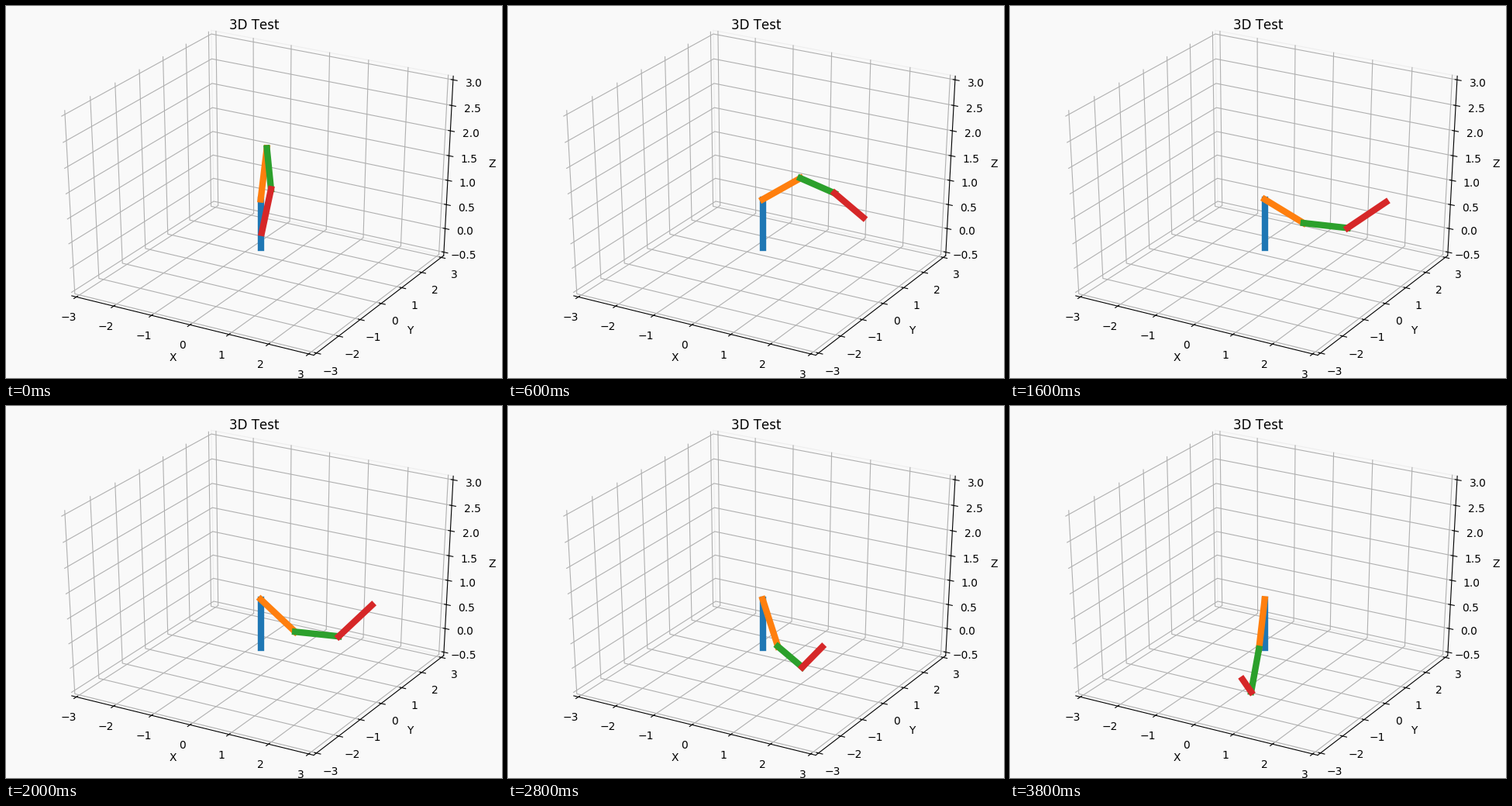
Recreate the animation shown at these times as a matplotlib script. Size 640 by 480 pixels, loop 4 s.

```python
import numpy as np
import matplotlib.pyplot as plt
from matplotlib.animation import FuncAnimation

plt.rcParams["font.family"] = "DejaVu Sans"
plt.rcParams["text.kerning_factor"] = 6

W, H, DPI = 640, 480, 100
STEPS, INTERVAL = 20, 200
DIST = 10                  # eye distance from the centre of the unit box
EDGE = 0.5 + 1 / 48        # panes reach slightly past the limits
CELL = 1 / 12
TICK_PAD = 11.5 * 48 / 806.4 * CELL
LABEL_PAD = 25 * 48 / 806.4 * CELL

# Key poses in degrees: yaw of the arm, then the pitch of its three links
KEY_STEPS = np.array([0, 3, 5, 6, 10, 12, 14, 17, 19])
KEY_POSES = np.array([
    (104, 60, -69.5, -140),
    (58, 16, -26.5, -39),
    (36, -1, -4, 8),
    (33, -14.5, -9, 15),
    (19, -37.5, -1.5, 43),
    (-4, -53, -13, 38),
    (-27, -51, -7, 40),
    (-47, -55, -24, 36),
    (-72.7, -54, -37, 34),
])
SLOPES = np.gradient(KEY_POSES, KEY_STEPS, axis=0)

elev, azim = np.radians((30, -60))
ce, se, ca, sa = np.cos(elev), np.sin(elev), np.cos(azim), np.sin(azim)
VIEW = np.array([
    (-sa, ca, 0),
    (-se * ca, -se * sa, ce),
    (ce * ca, ce * sa, se),
])


def project(p):
    """Box coordinates (centre at 0) to stage pixels."""
    x, y, z = VIEW @ np.asarray(p, float)
    depth = DIST - z
    return ((x / depth + 0.095) / 0.185 * W,
            H - (y / depth + 0.095) / 0.185 * H)


def to_box(x, y, z):
    return x / 6, y / 6, (z + 0.5) / 3.5 - 0.5


def pose(step):
    """Smooth (cubic Hermite) interpolation of the key poses, in radians."""
    i = min(np.searchsorted(KEY_STEPS, step, side="right"), len(KEY_STEPS) - 1) - 1
    span = KEY_STEPS[i + 1] - KEY_STEPS[i]
    t = (step - KEY_STEPS[i]) / span
    ease = t * t * (3 - 2 * t)
    deg = (KEY_POSES[i] * (1 - ease) + KEY_POSES[i + 1] * ease
           + span * t * (1 - t) * ((1 - t) * SLOPES[i] - t * SLOPES[i + 1]))
    return np.radians(deg)


def arm(step):
    """Joints of the arm on the stage; every link has length 1."""
    yaw, *pitches = pose(step)
    reach, height = 0, 1
    joints = [(0, 0, 0), (0, 0, 1)]
    for pitch in pitches:
        reach += np.cos(pitch)
        height += np.sin(pitch)
        joints.append((reach * np.cos(yaw), reach * np.sin(yaw), height))
    return [project(to_box(*j)) for j in joints]


fig = plt.figure(figsize=(W / DPI, H / DPI), dpi=DPI, facecolor="#f9f9f9")
ax = fig.add_axes([0, 0, 1, 1])
ax.set_xlim(0, W)
ax.set_ylim(H, 0)
ax.axis("off")


def path(points, color, lw=0.8):
    xs, ys = zip(*map(project, points))
    ax.plot(xs, ys, color=color, lw=lw)


def text(p, s, va):
    ax.text(*project(p), s, size=10, ha="center", va=va)


def shifted(p, axis, value):
    q = np.array(p, float)
    q[axis] = value
    return q


def draw_axis(i, name, edge, values, labels, tick_axis, sign):
    back = np.array((-EDGE, EDGE, -EDGE))
    edge = np.array(edge)
    out = np.sign(edge)
    j, k = (i + 1) % 3, (i + 2) % 3
    for v in values:
        corner = shifted(back, i, v)
        path([shifted(corner, j, -corner[j]), corner,
              shifted(corner, k, -corner[k])], "#b0b0b0")
    path([shifted(edge, i, -EDGE), shifted(edge, i, EDGE)], "black")
    for v, s in zip(values, labels):
        at = shifted(edge, i, v)
        base = at[tick_axis]
        path([shifted(at, tick_axis, base + 0.1 * sign * CELL),
              shifted(at, tick_axis, base - 0.2 * sign * CELL)], "black")
        text(at + out * TICK_PAD, s.replace("-", "\u2212"), "top")
    text(edge + out * LABEL_PAD, name, "center")


# Faint outline of the back wall
E = EDGE
path([(-E, E, E), (-E, E, -E), (E, E, -E), (E, E, E), (-E, E, E)], "#eeeeee")

flat = np.arange(-3, 4)
tall = np.arange(-0.5, 3.1, 0.5)
flat_labels = [str(v) for v in flat]
tall_labels = [f"{v:.1f}" for v in tall]
draw_axis(0, "X", (0, -E, -E), flat / 6, flat_labels, 1, 1)
draw_axis(1, "Y", (E, 0, -E), flat / 6, flat_labels, 0, -1)
draw_axis(2, "Z", (E, E, 0), (tall + 0.5) / 3.5 - 0.5, tall_labels, 0, -1)
ax.text(W / 2, 0.08 * H - 6 * DPI / 72, "3D Test", size=12, ha="center")

links = [ax.plot([], [], color=f"C{n}", lw=6, solid_capstyle="projecting")[0]
         for n in range(4)]


def update(step):
    joints = arm(step)
    for link, a, b in zip(links, joints, joints[1:]):
        link.set_data((a[0], b[0]), (a[1], b[1]))
    return links


anim = FuncAnimation(fig, update, frames=STEPS, interval=INTERVAL,
                     repeat=True, repeat_delay=0)
plt.show()
```
